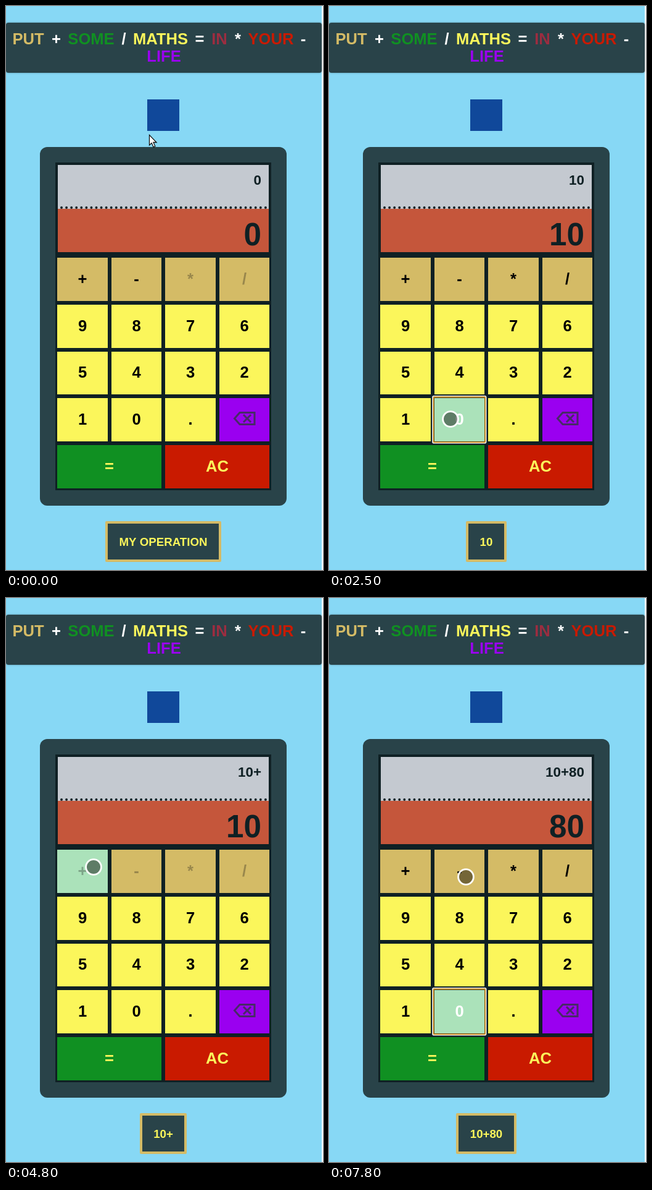
These frames come from a looping animation (514x912 px, 8 s). An HTML page with a canvas:

```html
<!DOCTYPE html>
<html lang="en">
<head>
<meta charset="utf-8">
<title>Calculator</title>
<style>
html, body { margin: 0; width: 100%; height: 100%; overflow: hidden; background: #fff; }
canvas { display: block; }
</style>
</head>
<body>
<canvas id="stage" width="514" height="912"></canvas>
<script>
const ctx = document.getElementById('stage').getContext('2d');
const LOOP = 8000, STEP = 100;
const SKY = '#87d8f5', SLATE = '#294349', INK = '#0f2024', TAN = '#d4bb66',
  YELLOW = '#fbf65b', GREEN = '#109022', RED = '#c91a00', PURPLE = '#9a00f0', MINT = '#abe2ba';

const title = [
  ['PUT', 36, TAN], ['+', 81.5, '#fff'], ['SOME', 138, GREEN], ['/', 191, '#fff'],
  ['MATHS', 250.5, YELLOW], ['=', 314, '#fff'], ['IN', 346, '#9b2d40'],
  ['*', 376, '#fff'], ['YOUR', 429.5, RED], ['-', 482, '#fff']
];

const left = [83, 171, 258, 346], right = [165, 252, 340, 427];
const top_ = [407, 483, 559, 634, 710], bottom = [477, 553, 628, 704, 780];
const baseline = [450, 526, 601, 677, 753];
const keys = [];
['+-*/', '9876', '5432', '10.<'].forEach((row, r) => {
  [...row].forEach((label, c) => addKey(label, r, c, c, r ? YELLOW : TAN, '#000'));
});
addKey('=', 4, 0, 1, GREEN, YELLOW);
addKey('AC', 4, 2, 3, RED, YELLOW);

function addKey(label, r, c0, c1, fill, color) {
  if (label === '<') fill = PURPLE;
  keys.push({ label, fill, color, x: left[c0], y: top_[r], w: right[c1] - left[c0],
    h: bottom[r] - top_[r], base: baseline[r] });
}

// Each state: start time, expression, entry, hovered key, focused key
const states = [
  [0, '0', '0', '', ''],
  [1500, '0', '0', '1', ''],
  [1600, '1', '1', '1', '1'],
  [2200, '1', '1', '0', '1'],
  [2400, '10', '10', '0', '0'],
  [4400, '10', '10', '+', '0'],
  [4600, '10+', '10', '+', ''],
  [6100, '10+', '10', '8', ''],
  [6300, '10+8', '8', '8', '8'],
  [7000, '10+8', '8', '0', '8'],
  [7100, '10+80', '80', '0', '0']
];

// Touch pointer path: time, x, y
const path = [
  [300, 235, 300], [400, 230, 430], [500, 217, 515], [600, 217, 515],
  [800, 160, 612], [900, 121, 668], [1000, 122, 686], [1100, 122, 686],
  [1200, 117, 678], [1600, 117, 678], [2000, 197, 668], [2900, 197, 668],
  [3100, 245, 664], [3200, 264, 645], [3300, 258, 634], [3400, 258, 634],
  [3800, 161, 446], [3900, 161, 446], [4000, 150, 440], [4100, 150, 440],
  [4200, 142, 435], [5100, 142, 435], [5300, 204, 512], [5400, 204, 512],
  [5500, 208, 500], [5700, 232, 520], [6000, 232, 520], [6100, 231, 537],
  [6300, 231, 537], [6600, 213, 660], [6700, 213, 660], [6800, 213, 662],
  [7100, 213, 662], [7800, 222, 451], [8000, 222, 451]
];

function box(x, y, w, h, fill, r = 0) {
  ctx.fillStyle = fill;
  ctx.beginPath();
  ctx.roundRect(x, y, w, h, r);
  ctx.fill();
}

function text(str, x, y, size, color, align = 'center') {
  ctx.font = `bold ${size}px "Liberation Sans", Arial, sans-serif`;
  ctx.textAlign = align;
  ctx.fillStyle = color;
  ctx.fillText(str, x, y);
}

function ring(x, y, w, h, r, color, width) {
  ctx.strokeStyle = color;
  ctx.lineWidth = width;
  ctx.beginPath();
  ctx.roundRect(x, y, w, h, r);
  ctx.stroke();
}

function polyline(points, close) {
  ctx.beginPath();
  points.forEach(([x, y]) => ctx.lineTo(x, y));
  if (close) ctx.closePath();
}

function drawHeader() {
  ctx.save();
  ctx.shadowColor = 'rgba(0,0,0,.35)';
  ctx.shadowBlur = 3;
  box(0, 27, 512, 81, SLATE, 4);
  ctx.restore();
  title.forEach(([word, x, color]) => text(word, x, 62, 25.6, color));
  text('LIFE', 256, 90, 25.6, PURPLE);
  box(229, 151, 52, 51, '#10489a');
}

function drawDisplay(expr, entry) {
  box(55, 228, 400, 580, SLATE, 12);
  box(80, 253, 350, 530, INK);
  box(84, 257, 342, 71, '#c4c9d0');
  box(84, 328, 342, 70, '#c5563b');
  ctx.fillStyle = INK;
  for (let i = 0; i < 42; i++) {
    ctx.beginPath();
    ctx.arc(90 + i * 8.07, 326, 2, 0, Math.PI * 2);
    ctx.fill();
  }
  text(expr, 414, 289, 22.4, INK, 'right');
  text(entry, 414, 387, 51.2, INK, 'right');
}

function drawBackspace() {
  ctx.strokeStyle = '#472b66';
  ctx.lineWidth = 3;
  polyline([[370.5, 667], [379, 657.5], [403, 657.5], [403, 676.5], [379, 676.5]], true);
  ctx.stroke();
  polyline([[385, 661], [397, 673]]);
  ctx.stroke();
  polyline([[397, 661], [385, 673]]);
  ctx.stroke();
}

function isDisabled(label, expr) {
  if (expr.endsWith('+')) return '+-*/'.includes(label);
  return expr === '0' && '*/'.includes(label);
}

function drawKeys(expr, hover, focus) {
  for (const k of keys) {
    const hot = k.label === hover;
    box(k.x, k.y, k.w, k.h, hot ? MINT : k.fill);
    if (k.label === '<') { drawBackspace(); continue; }
    const color = isDisabled(k.label, expr) ? 'rgba(16,16,16,.3)' : hot ? '#fff' : k.color;
    text(k.label, k.x + k.w / 2, k.base, 25.6, color);
  }
  const f = keys.find(k => k.label === focus);
  if (f) {
    ring(f.x - 3, f.y - 3.2, f.w + 5.6, f.h + 6, 2, '#fff', 1.6);
    ring(f.x - 1.4, f.y - 1.6, f.w + 2.6, f.h + 3, 1, '#e59a20', 1.6);
  }
}

function drawOperation(label) {
  ctx.font = 'bold 18.72px "Liberation Sans", Arial, sans-serif';
  const w = ctx.measureText(label).width + 45;
  const x = Math.round(255 - w / 2), x2 = Math.round(255 + w / 2);
  box(x, 833, x2 - x, 66, TAN, 2);
  box(x + 4, 837, x2 - x - 8, 58, SLATE);
  text(label, 255, 873, 18.72, YELLOW);
}

function drawPointer(t) {
  if (t < path[0][0]) {
    polyline([[232.5, 208.5], [232.5, 225], [236.2, 221.6], [239, 228],
      [241.8, 226.8], [239, 220.5], [244, 220.5]], true);
    ctx.fillStyle = '#fff';
    ctx.fill();
    ctx.strokeStyle = '#111';
    ctx.lineWidth = 1.3;
    ctx.stroke();
    return;
  }
  const i = path.findIndex(p => p[0] > t);
  const [t0, x0, y0] = path[i - 1], [t1, x1, y1] = path[i];
  const u = (t - t0) / (t1 - t0);
  const x = x0 + (x1 - x0) * u, y = y0 + (y1 - y0) * u;
  ctx.beginPath();
  ctx.arc(x, y, 12.4, 0, Math.PI * 2);
  ctx.fillStyle = 'rgba(0,0,0,.45)';
  ctx.fill();
  ctx.strokeStyle = '#fff';
  ctx.lineWidth = 2.8;
  ctx.stroke();
}

function draw(now) {
  const t = Math.floor((now % LOOP) / STEP) * STEP;
  const [, expr, entry, hover, focus] = states.filter(s => s[0] <= t).pop();
  box(0, 0, 514, 912, '#fff');
  box(0, 0, 512, 912, SKY);
  drawHeader();
  drawDisplay(expr, entry);
  drawKeys(expr, hover, focus);
  drawOperation(expr === '0' ? 'MY OPERATION' : expr);
  drawPointer(t);
}

let start;
function tick(now) {
  start ??= now;
  draw(Math.max(0, now - start));
  requestAnimationFrame(tick);
}
draw(0);
requestAnimationFrame(tick);
</script>
</body>
</html>
```
